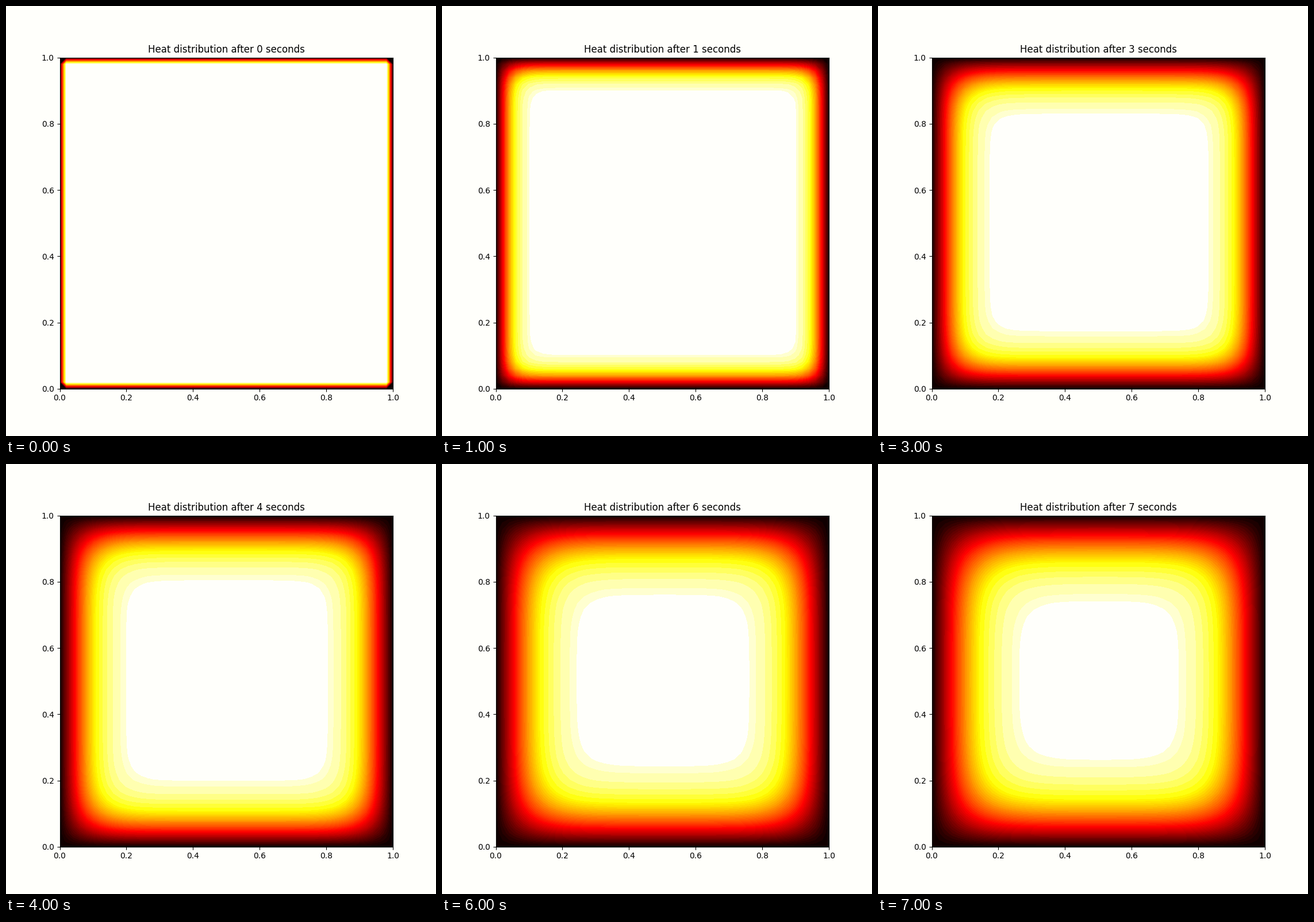
A matplotlib script that plays this animation: 748 by 748 pixels, repeating every 8 s.

```python
import numpy as np
import matplotlib.pyplot as plt
from matplotlib.animation import FuncAnimation

SIZE, DPI = 748, 100
PAPER = "#fffffb"
N = 50                  # grid points per side
RATE = 0.0494           # diffusion number of one step
STEPS_PER_SECOND = 50
SECONDS = 8

grid = np.linspace(0, 1, N)
levels = np.linspace(0, 1, 51)


def step(rows):
    """Advance the plate in place, sweeping from the lower left."""
    for i in range(1, N - 1):
        below, row, above = rows[i - 1], rows[i], rows[i + 1]
        for j in range(1, N - 1):
            row[j] += RATE * (below[j] + above[j] + row[j - 1] + row[j + 1]
                              - 4 * row[j])


def simulate():
    plate = np.zeros((N, N))
    plate[1:-1, 1:-1] = 1
    rows = plate.tolist()
    states = [plate]
    for _ in range(SECONDS - 1):
        for _ in range(STEPS_PER_SECOND):
            step(rows)
        states.append(np.array(rows))
    return states


def band_colors():
    colors = plt.get_cmap("hot")((levels[:-1] + levels[1:]) / 2)
    # The pale bands share colours in pairs.
    for k in [*range(37, 47, 2)]:
        colors[k:k + 2] = colors[k:k + 2].mean(axis=0)
    colors[48:] = plt.matplotlib.colors.to_rgba(PAPER)
    return colors


states = simulate()
colors = band_colors()

fig, ax = plt.subplots(figsize=(SIZE / DPI, SIZE / DPI), dpi=DPI,
                       facecolor=PAPER)


def draw(second):
    ax.clear()
    ax.set_facecolor(PAPER)
    ax.contourf(grid, grid, states[second], levels=levels, colors=colors,
                extend="neither")
    ax.set_title(f"Heat distribution after {second} seconds")
    ax.set_xlim(0, 1)
    ax.set_ylim(0, 1)
    return []


anim = FuncAnimation(fig, draw, frames=SECONDS, init_func=lambda: [],
                     interval=1000, repeat=True, repeat_delay=0)
plt.show()
```
